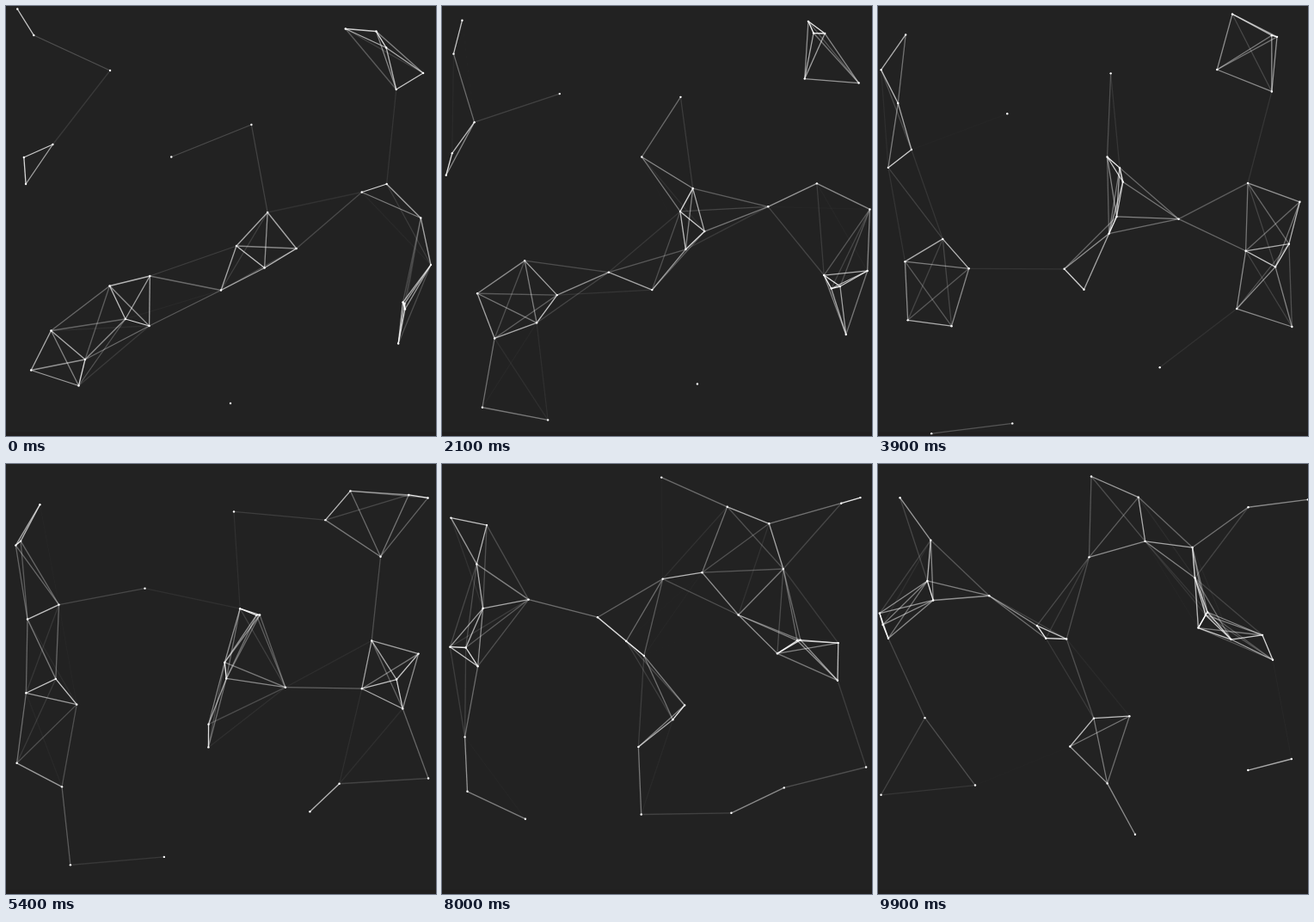
Animation of 500x500 px, one loop 10 s. Source, as an HTML page with a canvas:

```html
<!DOCTYPE html>
<html lang="en">
<head>
<meta charset="utf-8">
<title>Drifting network</title>
<style>
  html, body { margin: 0; width: 100%; height: 100%; overflow: hidden; background: #222; }
  canvas { display: block; width: 500px; height: 500px; }
</style>
</head>
<body>
<canvas id="stage" width="500" height="500"></canvas>
<script>
const SIZE = 500;
const LOOP = 10000;
const STEP = 100;
const REACH = 120;
const ctx = document.getElementById('stage').getContext('2d');

// Each dot at half-time: x (negative drifts left), y, vertical speed.
// Ordered from slowest to fastest sideways; pace() gives that speed.
const dots = [
  [-461, 289, -12.6], [-236, 329, -0.2], [-426, 205, -0.3], [-266, 61, -15.3],
  [289, 183, -19.1], [37, 43, 9.2], [-25, 274, -20.6], [-274, 173, -13.3],
  [488, 367, -5], [465, 35, 1.2], [-482, 222, -4.8], [158, 139, 12.9],
  [-403, 25, 14.6], [-14, 99, -12.3], [-259, 253, -10.2], [71, 474, -20.6],
  [21, 182, -4.9], [13, 85, 10.3], [-417, 267, -15.7], [-62, 255, -14],
  [230, 303, -2.1], [-70, 374, 2.1], [-18, 352, -11.7], [-441, 105, 5.5],
  [55, 164, -2.3], [-377, 67, -5.9], [-260, 234, -9.5], [-88, 286, -17.1],
  [-460, 257, -17.4], [-331, 256, 8], [346, 408, -10.7], [483, 38, 2.4],
  [176, 464, -19], [287, 175, 0], [-395, 366, 13.1]
];

// Sideways speed by rank, in pixels per second
const paceKeys = [
  [0, 0.5], [1, 2.7], [9, 7], [18, 9.2], [19, 11.6], [22, 14.7], [28, 15.8], [34, 19.7]
];

function pace(rank) {
  const k = Math.max(1, paceKeys.findIndex(([r]) => r >= rank));
  const [r0, v0] = paceKeys[k - 1];
  const [r1, v1] = paceKeys[k];
  return v0 + (v1 - v0) * (rank - r0) / (r1 - r0);
}

// Reflect a straight path off both walls
function bounce(v) {
  const m = Math.abs(v) % (2 * SIZE);
  return m > SIZE ? 2 * SIZE - m : m;
}

function link(a, b) {
  const d = Math.hypot(a.x - b.x, a.y - b.y);
  if (d >= REACH) return;
  ctx.strokeStyle = `rgba(255,255,255,${Math.min(1, 1.1 * (1 - d / REACH))})`;
  ctx.beginPath();
  ctx.moveTo(a.x, a.y);
  ctx.lineTo(b.x, b.y);
  ctx.stroke();
}

function draw(ms) {
  const t = (ms - LOOP / 2) / 1000;
  const spots = dots.map(([x, y, vy], rank) => ({
    x: bounce(x + pace(rank) * t) + 0.5,
    y: bounce(y + vy * t) + 0.5
  }));

  ctx.fillStyle = '#222';
  ctx.fillRect(0, 0, SIZE, SIZE);
  ctx.fillStyle = '#201e1e';
  ctx.fillRect(0, 495, SIZE, 5);

  ctx.lineWidth = 1.3;
  spots.forEach((a, i) => spots.slice(i + 1).forEach(b => link(a, b)));

  ctx.fillStyle = '#fff';
  for (const p of spots) {
    ctx.beginPath();
    ctx.arc(p.x, p.y, 1.2, 0, 2 * Math.PI);
    ctx.fill();
  }
}

const start = performance.now();

function tick() {
  const ms = (performance.now() - start) % LOOP;
  draw(Math.floor(ms / STEP) * STEP);
  requestAnimationFrame(tick);
}
tick();
</script>
</body>
</html>
```
